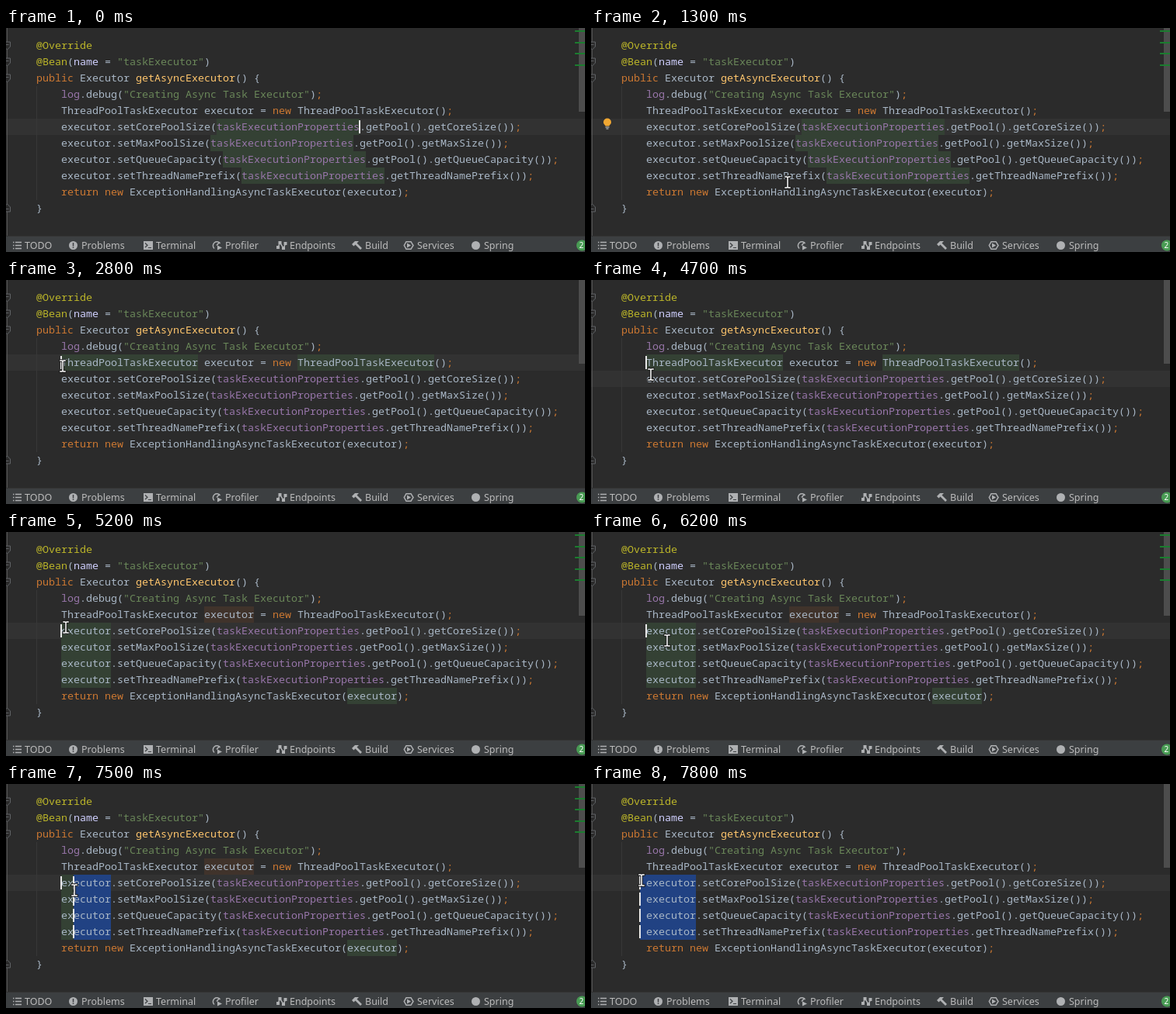
These frames come from a looping animation (745 by 289 pixels, 8 s). An HTML page:

```html
<!DOCTYPE html>
<html lang="en">
<head>
<meta charset="utf-8">
<title>Code editor</title>
<style>
html, body { margin: 0; width: 100%; height: 100%; overflow: hidden; background: #2b2b2b; }
svg { display: block; }
text { white-space: pre; }
.code text { font: 13.333px "Noto Sans Mono", "DejaVu Sans Mono", monospace; fill: #a9b7c6; }
.bar text { font: 12.5px "Noto Sans", "Open Sans", sans-serif; fill: #bbb; }
.fold path { fill: #2b2b2b; stroke: #606366; }
.icon { fill: none; stroke: #afb1b3; stroke-width: 1.5; }
.icon .solid { fill: #afb1b3; stroke: none; }
</style>
</head>
<body>
<svg width="745" height="289" viewBox="0 0 745 289">
  <rect width="745" height="289" fill="#2b2b2b"/>
  <rect id="line" width="745" height="21" fill="#323232"/>
  <path d="M39.5 75V222" stroke="#373737"/>
  <path d="M1.5 0V268" stroke="#555"/>
  <g class="fold" id="folds"></g>
  <g id="marks"></g>
  <g id="selection" fill="#214283"></g>
  <g class="code" id="code"></g>
  <g id="carets" fill="#e8e8e8"></g>
  <g id="bulb">
    <path d="M18.500 126.500C18.500 125 16 124.500 16 121.500a5 5 0 0 1 10 0C26 124.500 23.500 125 23.500 126.500Z" fill="#f0a732"/>
    <path d="M18.500 128H23.500M19.500 130H22.500" stroke="#9a9da0" stroke-width="1.300"/>
  </g>
  <rect x="737" width="8" height="108" fill="#4d4d4d"/>
  <g id="stripes" fill="#1b7d2f"></g>
  <g class="bar">
    <rect y="268" width="745" height="21" fill="#3c3f41"/>
    <path d="M0 268.500H745" stroke="#323232"/>
    <g id="labels"></g>
    <g class="icon">
      <path d="M12 276.500H20M12 280.500H20M12 284.500H20M9 276.500H10.500M9 280.500H10.500M9 284.500H10.500"/>
      <circle class="solid" cx="86.500" cy="280.500" r="5.500"/>
      <path d="M86.500 277V281.500M86.500 282.500V284" stroke="#3c3f41"/>
      <rect class="solid" x="177" y="275" width="12" height="11"/>
      <path d="M179 277.500L182 280.200L179 283M183 283.500H187" stroke="#3c3f41" stroke-width="1.200"/>
      <path d="M268 284.500A5 5 0 1 1 275.500 278M271 280.500L274 277"/>
      <path class="solid" d="M272 280.500L278 283.500L272 286.500Z"/>
      <path d="M350 283L352.500 277L357 284L359.500 278.500"/>
      <path class="solid" d="M348 281h4v4h-4zM350.500 275h4v4h-4zM355 282h4v4h-4zM357.500 276h4v4h-4z"/>
      <path class="solid" d="M445 279L449 275H454L451.500 277.500L458 284L456 286L449.500 279.500L447.500 281.500Z"/>
      <path d="M515 275.700H521L524 280.500L521 285.300H515L512.300 280.500Z"/>
      <path class="solid" d="M516 277.500L521 280.500L516 283.500Z"/>
      <circle class="solid" cx="604.500" cy="280.500" r="5.500"/>
    </g>
    <circle cx="741" cy="280.500" r="7" fill="#499c54"/>
    <text x="737.500" y="284" style="font-size:10px;fill:#fff">2</text>
  </g>
  <g id="mouse" fill="none" stroke-linecap="square">
    <path d="M-3 -7H-1L0 -6L1 -7H3M0 -6V6M-3 7H-1L0 6L1 7H3" stroke="#1a1a1a" stroke-width="3.400"/>
    <path d="M-3 -7H-1L0 -6L1 -7H3M0 -6V6M-3 7H-1L0 6L1 7H3" stroke="#fff" stroke-width="1.500"/>
  </g>
</svg>
<script>
const LOOP = 8000, LEFT = 39, CHAR = 8, TOP = 12, ROW = 21;
const $ = id => document.getElementById(id);
const colX = col => LEFT + col * CHAR;
const rowY = row => TOP + row * ROW;

function add(parent, name, attrs, content) {
  const el = document.createElementNS("http://www.w3.org/2000/svg", name);
  for (const key in attrs) el.setAttribute(key, attrs[key]);
  if (content) el.textContent = content;
  parent.appendChild(el);
  return el;
}
const show = (el, on) => el.setAttribute("visibility", on ? "visible" : "hidden");

const source = `@Override
@Bean(name = "taskExecutor")
public Executor getAsyncExecutor() {
    log.debug("Creating Async Task Executor");
    ThreadPoolTaskExecutor executor = new ThreadPoolTaskExecutor();
    executor.setCorePoolSize(taskExecutionProperties.getPool().getCoreSize());
    executor.setMaxPoolSize(taskExecutionProperties.getPool().getMaxSize());
    executor.setQueueCapacity(taskExecutionProperties.getPool().getQueueCapacity());
    executor.setThreadNamePrefix(taskExecutionProperties.getThreadNamePrefix());
    return new ExceptionHandlingAsyncTaskExecutor(executor);
}`.split("\n");

const syntax = [
  [/^"/, "#6a8759"],
  [/^@/, "#bbb529"],
  [/^(public|new|return|;)$/, "#cc7832"],
  [/^(log|taskExecutionProperties)$/, "#9876aa"],
  [/^getAsyncExecutor$/, "#ffc66d"],
  [/^name$/, "#d0d0ff"]
];

source.forEach((line, row) => {
  for (const token of line.matchAll(/"[^"]*"|@?\w+|;|[^\w\s";@]+/g)) {
    const rule = syntax.find(([pattern]) => pattern.test(token[0]));
    const el = add($("code"), "text", { x: colX(token.index), y: rowY(row) + 15 }, token[0]);
    if (rule) el.style.fill = rule[1];
  }
});

// Background boxes behind every use of a word
function markUses(word) {
  const group = add($("marks"), "g", {});
  source.forEach((line, row) => {
    for (const use of line.matchAll(new RegExp(`\\b${word}\\b`, "g"))) {
      const written = word === "executor" && row === 4;
      add(group, "rect", {
        x: colX(use.index), y: rowY(row), width: word.length * CHAR, height: ROW,
        fill: written ? "#40332b" : "#344134"
      });
    }
  });
  return group;
}
const fieldUses = markUses("taskExecutionProperties");
const typeUses = markUses("ThreadPoolTaskExecutor");
const variableUses = markUses("executor");

for (const row of [0, 1, 2, 10]) {
  const flip = row === 10 ? -1 : 1;
  const g = add($("folds"), "g", { transform: `translate(1.5 ${rowY(row) + 10.5}) scale(1 ${flip})` });
  add(g, "path", { d: "M-4 -4.500H4V1.500L0 5.500L-4 1.500Z" });
  add(g, "path", { d: "M-2 -1H2" });
}

const stripes = [0, 1, 2, 3, 4].map(i =>
  add($("stripes"), "rect", { x: 732, y: 3 + Math.round(i * 14.6), width: 13, height: 2 }));

const labels = { TODO: 24, Problems: 97, Terminal: 193, Profiler: 282, Endpoints: 365, Build: 462, Services: 529, Spring: 615 };
for (const name in labels) add($("labels"), "text", { x: labels[name], y: 285 }, name);

const caret = add($("carets"), "rect", { width: 2, height: 17 });
const columns = [5, 6, 7, 8].map(row => ({
  row,
  box: add($("selection"), "rect", { y: rowY(row), height: ROW }),
  caret: add($("carets"), "rect", { y: rowY(row) + 2, width: 2, height: 17 })
}));

// Pointer path: time, x, y
const path = [
  [1200, 254, 201], [1300, 253, 199], [1400, 216, 172], [1500, 150, 132], [1600, 85, 103], [1700, 89, 102],
  [2000, 89, 102], [2100, 84, 100], [2200, 84, 100], [2600, 73, 111],
  [4300, 73, 111], [4400, 79, 118], [4500, 77, 122], [5100, 77, 122], [5500, 75, 127],
  [6100, 75, 127], [6200, 98, 140], [6600, 130, 180], [6800, 141, 206], [7000, 137, 196],
  [7200, 121, 172], [7500, 88, 137], [7800, 65, 124], [8000, 65, 124]
];
function pointer(t) {
  const i = Math.max(1, path.findIndex(p => p[0] >= t));
  const [t0, x0, y0] = path[i - 1], [t1, x1, y1] = path[i];
  const k = Math.max(0, (t - t0) / (t1 - t0));
  return [x0 + (x1 - x0) * k, y0 + (y1 - y0) * k];
}

const within = (t, ...spans) => spans.some(([from, to]) => t >= from && t < to);

function render(ms) {
  const t = Math.floor(ms / 100) * 100;
  const [x, y] = pointer(t);
  $("mouse").setAttribute("transform", `translate(${Math.round(x)} ${Math.round(y)})`);
  show($("mouse"), t >= 1200);

  $("line").setAttribute("y", rowY(within(t, [2800, 4700]) ? 4 : 5));
  show(fieldUses, t < 2800);
  show(typeUses, within(t, [2800, 4800]));
  const variable = within(t, [4800, 7600]);
  show(variableUses, variable);
  stripes.forEach((s, i) => show(s, variable || (t < 2800 && i < 4)));

  show($("bulb"), within(t, [100, 2800], [3700, 4700]));
  $("bulb").setAttribute("transform", `translate(0 ${t < 2800 ? 0 : -ROW})`);

  caret.setAttribute("x", t < 2800 ? 454 : 70);
  caret.setAttribute("y", rowY(within(t, [2800, 5200]) ? 4 : 5) + 2);
  show(caret, within(t, [0, 300], [900, 1200], [1700, 2300], [2800, 3200], [4000, 7600]));

  const col = Math.round((x - LEFT) / CHAR), topRow = Math.floor((y - TOP) / ROW);
  for (const c of columns) {
    const on = t >= 7100 && c.row >= topRow;
    c.box.setAttribute("x", colX(col));
    c.box.setAttribute("width", Math.max(0, colX(12) - colX(col)));
    c.caret.setAttribute("x", colX(col) - 1);
    show(c.box, on);
    show(c.caret, on);
  }
}

const start = performance.now();
function tick() {
  render((performance.now() - start) % LOOP);
  requestAnimationFrame(tick);
}
tick();
</script>
</body>
</html>
```
